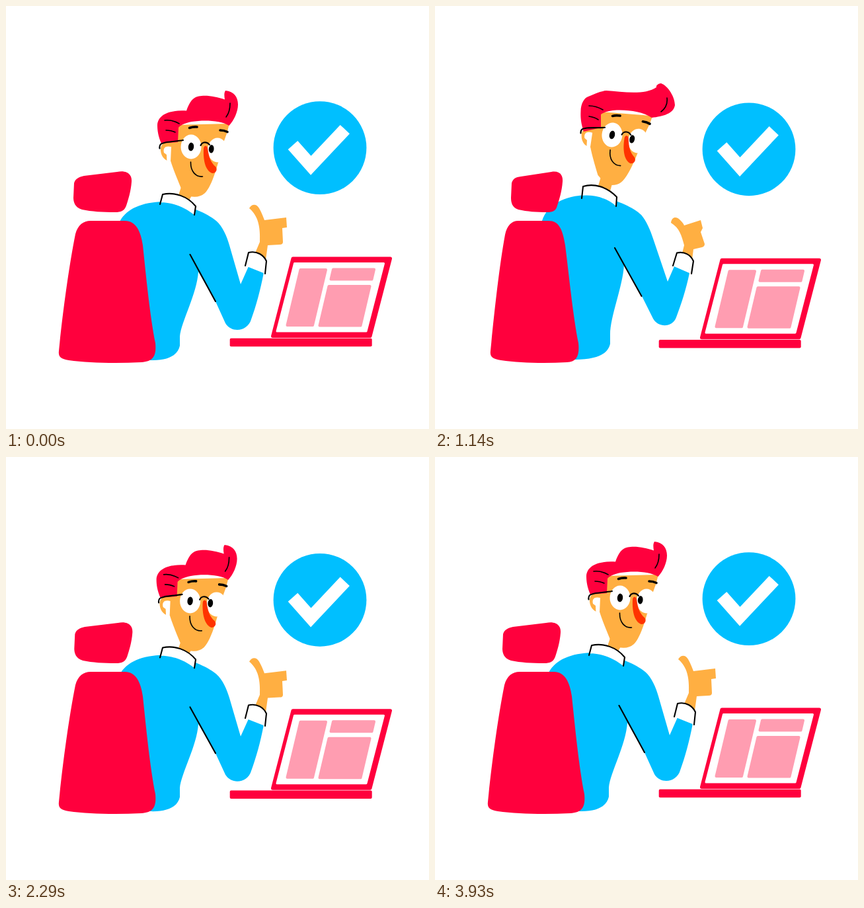
These frames come from a looping animation (640 by 640 pixels, 4 s). An HTML page:

```html
<!DOCTYPE html>
<html lang="en">
<head>
<meta charset="utf-8">
<title>All done</title>
<style>
html, body { margin: 0; width: 100%; height: 100%; overflow: hidden; background: #fff; }
svg { display: block; width: 100vw; height: 100vh; }
.red { fill: #ff003d; }
.blue { fill: #00bfff; }
.skin { fill: #ffaf42; }
.white { fill: #fff; }
.pink { fill: #ff9db1; stroke: #ff9db1; stroke-width: 4; stroke-linejoin: round; }
.line { fill: none; stroke: #000; stroke-width: 2.1; stroke-linecap: round; stroke-linejoin: round; }
.thin { stroke-width: 1.6; }
.brow { stroke-width: 3.6; }
</style>
</head>
<body>
<svg viewBox="0 0 640 640">
  <g id="badge">
    <circle class="blue" cx="475" cy="214.6" r="70.4"/>
    <path id="check" d="M434,210.5 L461.3,241.3 L512.8,186.6" fill="none" stroke="#fff" stroke-width="19.5" pathLength="100" stroke-dasharray="100 200"/>
  </g>
  <g id="laptop">
    <rect class="red" x="338.7" y="502.8" width="215" height="12.4" rx="2"/>
    <path class="red" stroke="#ff003d" stroke-width="5" stroke-linejoin="round" d="M434,382 L581.5,382 L551,499.5 L403.5,499.5 Z"/>
    <path fill="#fff" stroke="#fff" stroke-width="3" stroke-linejoin="round" d="M436.5,389.5 L571.5,389.5 L545,492 L410,492 Z"/>
    <path class="pink" d="M445.5,399 L484,399 L464,483 L425.5,483 Z M495,398.5 L557,398.5 L553.5,413.5 L491.5,413.5 Z M488.5,424 L550.5,424 L536.5,483.5 L474.5,483.5 Z"/>
  </g>
  <path id="neck" class="skin"/>
  <path id="hand" class="skin"/>
  <path id="body" class="blue"/>
  <path id="collar" class="white"/>
  <path id="collarLine" class="line"/>
  <path id="cuff" class="white"/>
  <path id="cuffLine" class="line"/>
  <path id="sleeve" class="line"/>
  <path id="back" class="red"/>
  <path id="rest" class="red"/>
  <g id="head">
    <path class="skin" d="M252,206 C239,204 233,210 234,219 C235,229 242,236 252,235 Z"/>
    <path class="skin" d="M256,180 L338,178 Q335,192 330,204 L330,218 L321,237 C316,255 309,275 301,283 Q292,291 278,288 L265,276 C258,259 253,247 249,234 L250,205 Z"/>
    <path class="white" d="M239,222 C237,214 242,211 250,213 L249,236 Q246,238 243.5,236 L243,225 Z"/>
    <path id="hair" class="red"/>
    <path id="locks" class="line thin"/>
    <path class="line brow" d="M277.5,184.5 Q283,182.5 289,183 M324,188 Q330,188 335,190.5"/>
    <ellipse class="white" cx="280" cy="213" rx="15.5" ry="18.5"/>
    <ellipse class="white" cx="320" cy="218" rx="15" ry="18.5"/>
    <g id="pupils">
      <ellipse rx="4.2" ry="6.4" cx="280" cy="213"/>
      <ellipse rx="3.9" ry="6.2" cx="310.7" cy="216.3"/>
    </g>
    <path class="line" d="M232.5,215.5 C231.5,209 235,208 241,206.5 C250,205 259,204.5 268,203 M294.5,211 C297,205 304,205 308,210"/>
    <path fill="#ff3300" d="M299,216 C299,211 304.5,210 305.2,216 C307,229 310,237 317,243 C321,248 317,253.5 312,253 C303,250 298,236 299,216 Z"/>
    <path class="line thin" d="M279.5,236 C279,250 287,259 297.5,258"/>
  </g>
</svg>
<script>
const $ = id => document.getElementById(id);
const LOOP = 4000;
const EYE = { x: 280, y: 213 };
const PAIR = /(-?[\d.]+),(-?[\d.]+)/g;

// Poses in order: rest, crouch, stretch, sway. Head = eye x, eye y, tilt.
const headPose = [[280, 213, 0], [323, 230, 7], [268, 195, 6], [257, 209, -10]];

const edit = (d, fn) => d.replace(PAIR, (m, x, y) => fn(+x, +y).map(v => +v.toFixed(2)).join());
const shift = (d, dx) => edit(d, (x, y) => [x + dx, y]);

// Stage coordinates to head coordinates for a pose.
function toHead(d, pose) {
  const [ex, ey, tilt] = headPose[pose];
  const a = -tilt * Math.PI / 180, c = Math.cos(a), s = Math.sin(a);
  return edit(d, (x, y) => [
    (x - ex) * c - (y - ey) * s + EYE.x,
    (x - ex) * s + (y - ey) * c + EYE.y
  ]);
}

const collarLine = [
  'M233,300 L237,285 C255,281 275,288 287,303 L285,316',
  'M251,306 L256,291 C272,287 293,295 305,313 L302,326',
  'M222,291 L224,273 C240,268 260,273 275,289 L274,303',
  'M222,302 L224,286 C240,280 262,287 275,301 L274,314'
];
const collarEnd = [
  ' C270,304 252,297 233,297 Z',
  ' C287,311 268,303 251,303 Z',
  ' C260,290 240,285 222,287 Z',
  ' C262,304 243,297 222,298 Z'
];
const cuffLine = [
  'M362,393 L367,373 C380,370 390,377 394,386 L392,405',
  'M344,434 L348,424 C359,422 366,427 371,432 L367,447',
  'M360,393 L366,373.5 C378,371 387,377 391,386 L388,405',
  'M359,386 L364,366 C376,363 387,370 391,378 L389,397'
];
const back = 'M105,345 C109,331 117,325 128,325 L180,325 C196,325 204,340 207,362 C212,410 218,470 226,510 C228,530 222,538 205,539 C165,541 125,540 95,536 C82,534 79,530 80,522 C85,470 95,395 105,345 Z';
const rest = 'M103,268 C105,261 110,259 118,257 L168,251 C182,248 191,254 190,266 C189,280 185,293 182,302 C179,310 174,312 165,312 C145,312 130,311 115,308 C104,305 102,296 102,290 Z';
const hair = 'M235,208 C230,196 229,188 229,180 C230,163 250,157 273,158.5 C279,142 284,137 296,136 C307,135 320,138 331,141.5 C330,135 330,131 332,128 C345,129 351,138 351,149 C351,160 345,173 337.5,181 C325,173 300,172 281,175 C271,177 264,180 261,184 L260,206 Z';
const locks = 'M240,173 C248,172 255,174 262,178 M242,188 Q250,188 256,191 M339,147 C339,155 337,163 333,168';

const shapes = {
  neck: [
    'M268,265 L261,286 L277,294 L285,280 Z',
    'M300,270 L285,294 L299,305 L306,290 Z',
    'M252,255 L247,272 L265,280 L270,262 Z',
    'M252,265 L248,284 L265,292 L268,275 Z'
  ],
  hand: [
    'M368,306 C372,299 379,299 383,306 C387,313 389,319 391,324 L424,320 L425,335 L418,336 L419,357 Q419,361 414,361 L396,362 L393,384 L376,376 L384,357 C385,335 382,318 368,306 Z',
    'M347,400 C348,400 352,400 356,400 C358,397 361,396 364,396 L368,399 L371,410 L373,417 L375,423 Q375,427 371,427 L369,430 L366,434 L354,428 L354,409 C351,408 347,408 347,400 Z',
    'M357,328 C358,319 365,318 370,323 C373,326 376,329 377,332 L402,324 L405,336 L402,342 L408,360 Q408,364 404,365 L391,368 L389,384 L373,378 L377,362 C373,347 370,336 357,328 Z',
    'M360,301 C364,293 371,293 376,300 C381,307 383,312 385,316 L417,310 L419,324 L412,326 L415,347 Q415,351 411,351 L393,354 L390,375 L373,368 L380,350 C379,332 374,311 360,301 Z'
  ],
  body: [
    'M172,326 C183,306 206,297 238,296 C262,297 300,310 318,325 C328,334 334,348 338,362 L355,421 L367,394 L390,403 C385,430 378,455 371,474 C366,492 342,496 332,480 L317,447 L291,402 C289,435 265,478 263,500 L263,514 C260,528 246,537 218,536 L190,500 Z',
    'M188,326 C197,308 214,302 240,302 C265,302 310,318 332,337 C343,348 346,370 345,385 L344,436 L344,439 L364,446 C358,465 350,485 343,498 C337,513 314,514 308,500 L300,459 L294,429 C288,452 264,482 262,502 L260,515 C257,526 248,534 234,534 L204,500 Z',
    'M162,325 C170,300 196,287 230,286 C254,286 296,300 312,316 C320,325 326,340 330,352 L352,417 L362,394 L385,404 C380,428 373,450 365,471 C359,487 338,487 330,473 L313,439 L286,392 C284,425 265,470 265,497 L265,511 C262,526 246,535 212,535 L190,500 Z',
    'M166,326 C180,306 200,298 228,298 C254,299 290,310 304,319 C316,328 322,340 328,352 L352,417 L364,388 L386,396 C383,422 377,450 368,473 C362,488 340,487 332,474 L315,443 L286,398 C284,430 265,470 265,498 L265,512 C262,528 246,538 218,538 L190,500 Z'
  ],
  collar: collarLine.map((d, i) => d + collarEnd[i]),
  collarLine,
  cuff: cuffLine.map(d => d + ' Z'),
  cuffLine,
  sleeve: ['M278.5,376 L317,447', 'M285.5,379 L300,459', 'M272,366 L312.5,439', 'M272,374 L315,443'],
  back: [
    back,
    shift(back, 14),
    'M106,346 C109,332 116,325 126,325 L172,325 C187,325 193,337 197,362 C203,410 209,470 217,510 C219,530 214,538 200,539 C165,541 128,540 100,536 C86,534 83,530 84,522 C89,470 97,395 106,346 Z',
    shift(back, 1)
  ],
  rest: [
    rest,
    shift(rest, 14),
    'M116,268 C118,261 122,259 130,258 L176,251 C188,249 194,255 193,266 C192,280 188,293 185,302 C183,310 178,312 170,312 C152,312 140,311 126,308 C116,305 115,296 115,290 Z',
    rest
  ],
  hair: [
    hair,
    hair,
    toHead('M225,190 C221,178 220,169 220.5,160 C220.5,147 226,139 232,137 C240,134 249,129 259,128 C285,130 318,135 335,123 C334,120 338,117.5 342,117 C353,121 363,138 363,150 C361,163 345,167 328,169 C315,160 295,157 275,157.5 C265,158 257,160 251,164 L251,184 Z', 2),
    toHead('M212,216 C206,206 202,196 201.5,186 C202,168 220,158 241,157 C241,142 250,136 262,133.5 C269,132 276,132 281,132.5 C280,127 280,123 282,121 C299,120 317,130 317,143 C317,153 313,165 309,170 C295,167 270,170 252,175 C243,179 236,182 233,187 L236,206 Z', 3)
  ],
  locks: [
    locks,
    locks,
    toHead('M233,151 C240,151 247,153 254,157 M233,167 Q241,168 247,172 M351,139 C352,147 350,154 342,160', 2),
    toHead('M211,178 C219,176 227,177 234,179 M215,193 Q223,192 231,194 M305,138 C307,146 306,154 303,160', 3)
  ]
};

const points = {};
for (const id in shapes)
  points[id] = shapes[id].map(d => [...d.matchAll(PAIR)].map(m => [+m[1], +m[2]]));

const smooth = k => k * k * (3 - 2 * k);
const linear = k => k;

// Keys are [time, value...]; returns the blended values.
function track(keys, t, ease = smooth) {
  let i = 0;
  while (i < keys.length - 2 && t >= keys[i + 1][0]) i++;
  const a = keys[i], b = keys[i + 1];
  const k = ease(Math.min(1, Math.max(0, (t - a[0]) / (b[0] - a[0]))));
  return a.slice(1).map((v, n) => v + (b[n + 1] - v) * k);
}

const keys = {
  pose: [[0, 1, 0, 0, 0], [50, 1, 0, 0, 0], [290, 0, 1, 0, 0], [400, 0, 1, 0, 0], [740, .5, 0, .5, 0],
    [1140, 0, 0, 1, 0], [1700, 0, 0, 0, 1], [1790, 0, 0, 0, 1], [2290, 1, 0, 0, 0], [4000, 1, 0, 0, 0]],
  lift: [[0, 0], [100, -2], [290, 0], [1140, 0], [1600, -9], [1790, 0], [2290, 3.5], [2860, 0], [4000, 0]],
  chair: [[0, 0], [400, 0], [740, -2], [1140, 0], [1500, -3.5], [1790, 0], [4000, 0]],
  rest: [[0, 0], [1790, 0], [2290, 1.3], [3200, 0], [4000, 0]],
  slide: [[0, 0], [50, 0], [290, -11], [400, -11], [740, 6], [1080, 0], [4000, 0]],
  float: [[0, 0], [290, 1.3], [1140, 2.2], [1790, 2.2], [2290, 1.7], [3070, .8], [3930, 0], [4000, 0]],
  lids: [[0, 1], [150, 1], [250, .24], [330, .24], [430, 1], [4000, 1]],
  check: [[0, 100], [50, 100], [240, 0], [560, 0], [900, 100], [4000, 100]]
};

function draw(t) {
  const w = track(keys.pose, t);
  const [lift] = track(keys.lift, t);
  const [chair] = track(keys.chair, t);
  const [restX] = track(keys.rest, t);
  const [slide] = track(keys.slide, t);
  const [float] = track(keys.float, t, linear);
  const [lids] = track(keys.lids, t);
  const [check] = track(keys.check, t);
  const blend = list => list.reduce((sum, v, i) => sum + v * w[i], 0);

  for (const id in shapes) {
    const inHead = id === 'hair' || id === 'locks';
    const seat = id === 'back' || id === 'rest';
    const dx = seat ? chair + (id === 'rest' ? restX : 0) : 0;
    let n = 0;
    $(id).setAttribute('d', edit(shapes[id][0], () => {
      const x = blend(points[id].map(p => p[n][0]));
      const y = blend(points[id].map(p => p[n][1]));
      n++;
      return [x + dx, inHead || seat ? y : y + lift * Math.min(1, (540 - y) / 240)];
    }));
  }

  const [ex, ey, tilt] = [0, 1, 2].map(k => blend(headPose.map(p => p[k])));
  $('head').setAttribute('transform',
    `translate(${ex - lift * (lift > 0 ? .4 : 0)} ${ey + lift * 1.4}) rotate(${tilt}) translate(${-EYE.x} ${-EYE.y})`);
  [...$('pupils').children].forEach((p, i) => {
    const cx = +p.getAttribute('cx'), cy = +p.getAttribute('cy');
    const drop = (1 - lids) * 2.5;
    p.setAttribute('transform', `translate(${cx + drop * (1 - i)} ${cy + drop}) rotate(6) scale(1 ${lids}) translate(${-cx} ${-cy})`);
  });

  $('laptop').setAttribute('transform', `translate(${slide} ${float})`);
  $('badge').setAttribute('transform', `translate(0 ${float})`);
  $('check').setAttribute('stroke-dasharray', `${check} 200`);
  $('check').style.visibility = check > .5 ? 'visible' : 'hidden';
}

const start = performance.now();
function tick() {
  draw((performance.now() - start) % LOOP);
  requestAnimationFrame(tick);
}
draw(0);
requestAnimationFrame(tick);
</script>
</body>
</html>
```
